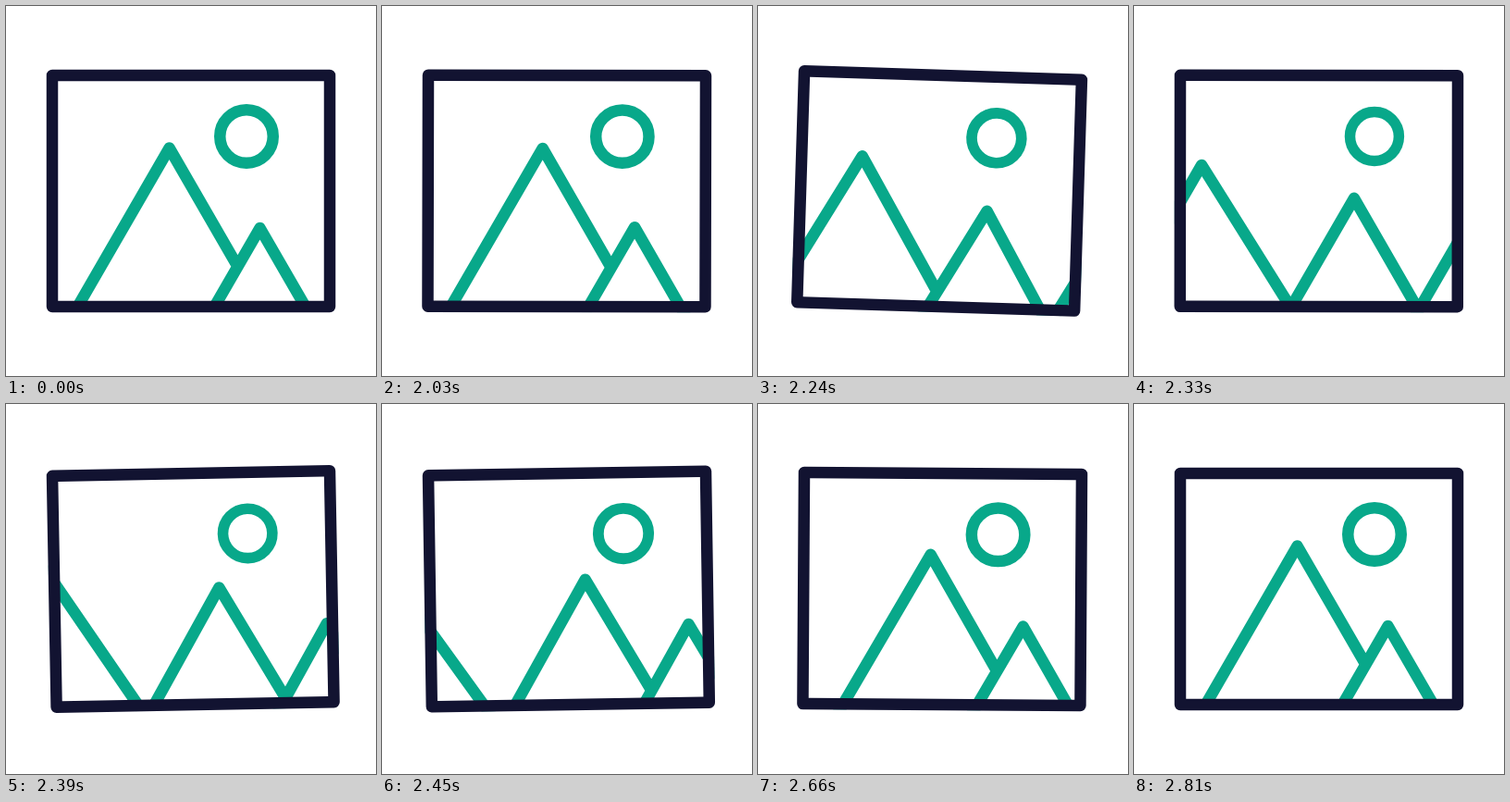
Write an HTML page that moves like this. It is 400 px wide and 400 px high and loops after 2.84 s.

```html
<!DOCTYPE html>
<html>
<head>
<meta charset="utf-8">
<style>
  html, body { margin: 0; height: 100%; overflow: hidden; background: #fff; }
  svg { display: block; width: 100vw; height: 100vh; }
</style>
</head>
<body>
<svg viewBox="0 0 400 400" fill="none" stroke-width="12.5" stroke-linecap="round" stroke-linejoin="round">
  <clipPath id="inside"><rect x="44" y="69" width="312" height="262"/></clipPath>
  <g id="picture">
    <g stroke="#08a88a">
      <path id="hills" clip-path="url(#inside)"/>
      <circle id="sun" cx="260" cy="141" r="28.75"/>
    </g>
    <rect x="50" y="75" width="300" height="250" stroke="#121331"/>
  </g>
</svg>
<script>
const LOOP = 2840, START = 2000, FIRST = 2030, STEP = 30, END = 2810;
const SLOPE = Math.tan(Math.PI / 6);
const FLOOR = 360;
// Keys are [time, value]
const SWING = [[START, 0], [2230, 1.85], [2405, -1.15], [2590, 0.48], [END, 0]];
const SHRINK = [[START, 1], [2330, 0.92], [2660, 1]];
const SLIDE = [[START, 0], [END, 1]];
const [picture, hills, sun] = ['picture', 'hills', 'sun'].map(id => document.getElementById(id));

const ease = u => 0.2 * u + 0.8 * u * u * (3 - 2 * u);

function valueAt(keys, t) {
  if (t <= keys[0][0]) return keys[0][1];
  for (let i = 1; i < keys.length; i++) {
    const [t0, a] = keys[i - 1], [t1, b] = keys[i];
    if (t < t1) return a + (b - a) * ease((t - t0) / (t1 - t0));
  }
  return keys[keys.length - 1][1];
}

const leftSlope = ([x, y], level) => x - SLOPE * (level - y);
const rightSlope = ([x, y], level) => x + SLOPE * (level - y);
const meeting = (a, b) => ((b[0] - a[0]) / SLOPE + a[1] + b[1]) / 2;

function hill(peak, footX, footY) {
  return `M${leftSlope(peak, FLOOR)} ${FLOOR}L${peak}L${footX} ${footY}`;
}

// The hills move up one place: large leaves, small grows, a new one enters
function hillPath(p) {
  const q = 1 - p;
  const large = [176.5 - p * (250 + 75 * p), 153.5 + 50 * p];
  const small = [274.5 - 98 * p, 240 - 86.5 * p];
  const fresh = [274.5 + q * (117 + 28 * q), 240];
  const largeFoot = 281.6 + 120 * p;
  const smallFoot = p ? meeting(small, fresh) : FLOOR;
  return hill(large, leftSlope(small, largeFoot), largeFoot)
    + hill(small, rightSlope(small, smallFoot), smallFoot)
    + (p ? hill(fresh, rightSlope(fresh, FLOOR), FLOOR) : '');
}

function draw(now) {
  const time = now % LOOP;
  const t = time < FIRST ? 0 : FIRST + Math.floor((time - FIRST) / STEP) * STEP;
  hills.setAttribute('d', hillPath(valueAt(SLIDE, t)));
  sun.setAttribute('transform', `translate(260 141) scale(${valueAt(SHRINK, t)}) translate(-260 -141)`);
  picture.setAttribute('transform', `rotate(${valueAt(SWING, t)} 200 75)`);
}

const begin = performance.now();
function tick() {
  draw(performance.now() - begin);
  requestAnimationFrame(tick);
}
tick();
</script>
</body>
</html>
```
